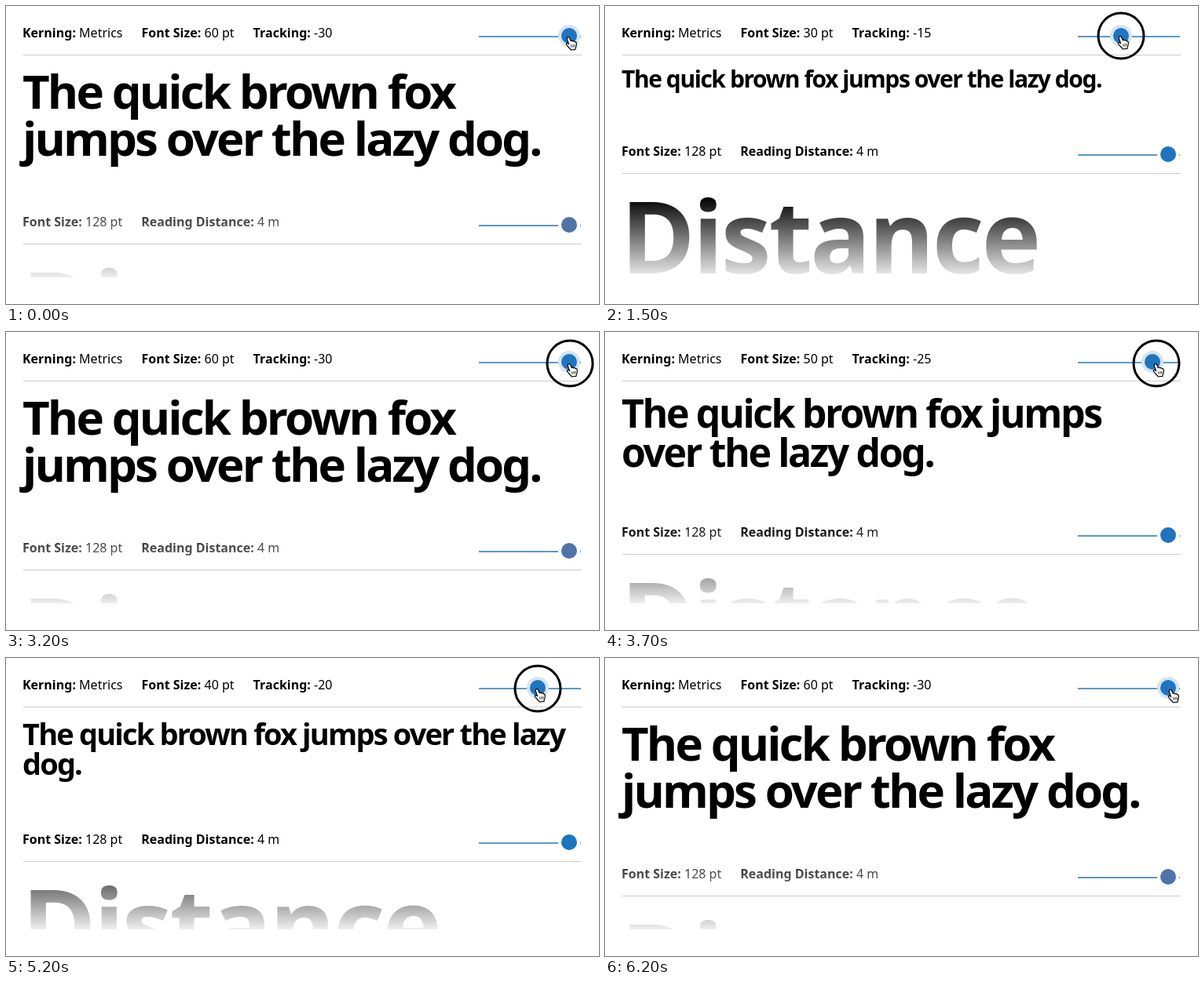
An HTML page for the animation above (6300 ms loop, 755 by 380 pixels).

```html
<!DOCTYPE html>
<html lang="en">
<head>
<meta charset="utf-8">
<title>Type size slider</title>
<style>
  html, body { margin: 0; width: 100%; height: 100%; overflow: hidden; background: #fff; }
  #stage { position: relative; width: 755px; height: 380px; overflow: hidden; color: #000; font-family: "Noto Sans", sans-serif; }
  #stage div, #stage svg, h1 { position: absolute; }
  .row { left: 0; top: 0; width: 755px; height: 63px; }
  .labels { left: 21px; top: 24px; display: flex; gap: 24px; font-size: 16px; line-height: 20px; white-space: pre; }
  .divider { left: 22px; top: 62px; width: 711px; height: 1px; background: #ccc; z-index: 2; }
  .rail { left: 602px; top: 38px; width: 130px; height: 2px; background: #5b9ac8; z-index: 2; }
  .thumb { left: 105px; top: -10px; width: 20px; height: 20px; border-radius: 50%; background: #1f74c0; box-shadow: 0 0 0 4px #fff; }
  .active .thumb { box-shadow: 0 0 0 4px #d5e4f0; }
  h1 { left: 21px; top: 78px; width: 712px; margin: 0; font-weight: 700; line-height: 1; letter-spacing: -.048em; }
  #sample { left: 20px; top: 77px; font-size: 128px; font-weight: 700; line-height: 128px; letter-spacing: -.023em; }
  #fade { left: 0; top: 244px; width: 755px; height: 136px; z-index: 1;
    background: linear-gradient(#fff0, #fff 109px); }
  #floor { left: 0; top: 346px; width: 755px; height: 34px; background: #fff; z-index: 3; }
  #pointer { left: 0; top: 0; overflow: visible; z-index: 4; }
</style>
</head>
<body>
<div id="stage">
  <div class="row active">
    <div class="labels">
      <span><b>Kerning:</b> Metrics</span>
      <span><b>Font Size:</b> <span id="points">60</span> pt</span>
      <span><b>Tracking:</b> <span id="tracking">-30</span></span>
    </div>
    <div class="rail"><div class="thumb" id="sizeThumb"></div></div>
    <div class="divider"></div>
  </div>
  <h1 id="heading">The quick brown fox jumps over the lazy dog.</h1>
  <div id="lower">
    <div class="row">
      <div class="labels">
        <span><b>Font Size:</b> 128 pt</span>
        <span><b>Reading Distance:</b> 4 m</span>
      </div>
      <div class="rail"><div class="thumb" id="distanceThumb"></div></div>
      <div class="divider"></div>
    </div>
    <div id="sample">Distance</div>
  </div>
  <div id="fade"></div>
  <div id="floor"></div>
  <svg id="pointer" width="1" height="1">
    <circle id="ring" r="29" fill="none" stroke="#000" stroke-width="3"/>
    <path d="M-2.4 1.2C-1.6 .1 0 .5 .6 1.8L2.2 5.6C3 4.8 4.3 5 4.8 6C5.6 5.4 6.8 5.8 7.1 6.8C8.2 6.4 9.2 7.2 9.3 8.6C9.5 11 9.2 12.6 8.2 14.2L8 16.3L2 17L1.4 15.6C-.6 14.2 -1.6 12.2 -3.4 10.4C-4.3 9.3 -3.2 8 -1.8 8.7L-.4 9.6L-2.6 3.4C-2.9 2.6 -2.9 1.8 -2.4 1.2Z"
      fill="#fff" stroke="#000" stroke-width="1.2" stroke-linejoin="round"/>
    <path d="M2.6 10.4L3 13.8M4.8 10.2L5.1 13.6M6.8 10L7 13.3" fill="none" stroke="#000" stroke-width=".8"/>
  </svg>
</div>
<script>
  const LOOP = 6300, TICK = 100, EASE_MS = 120;
  const PRESS = 200, RELEASE = 6000;

  // time, point size
  const sizes = [[0, 60], [640, 50], [1040, 40], [1240, 30], [2000, 40], [2340, 50], [2540, 60],
    [3540, 50], [3900, 40], [4240, 30], [5134, 40], [5334, 50], [5534, 60]];

  // time, x, y
  const path = [[0, 717, 39], [300, 717, 37], [400, 716, 37], [700, 706, 37], [1000, 686, 37],
    [1300, 663, 38], [1450, 657, 38], [1650, 657, 38], [2000, 667, 38], [2300, 687, 39],
    [2500, 706, 39], [2700, 716, 39], [3000, 718, 40], [3200, 718, 40], [3400, 714, 40],
    [3700, 702, 40], [4200, 666, 40], [4400, 656, 39], [4900, 655, 39], [5100, 665, 39],
    [5200, 677, 39], [5400, 699, 39], [5600, 716, 38], [5700, 721, 38], [5900, 721, 39], [6300, 721, 40]];

  const byId = id => document.getElementById(id);
  const [heading, lower, points, tracking, sizeThumb, distanceThumb, pointer, ring] =
    ["heading", "lower", "points", "tracking", "sizeThumb", "distanceThumb", "pointer", "ring"].map(byId);
  const mix = (a, b, k) => a + (b - a) * k;
  const clamp = k => Math.max(0, Math.min(1, k));

  function cursorAt(t) {
    const next = path.findIndex(p => p[0] > t);
    const a = path[next - 1], b = path[next];
    const k = (t - a[0]) / (b[0] - a[0]);
    return [mix(a[1], b[1], k), mix(a[2], b[2], k)];
  }

  function sizeAt(t) {
    const i = sizes.findLastIndex(s => s[0] <= t);
    const [start, target] = sizes[i];
    const from = i ? sizes[i - 1][1] : target;
    const rest = 1 - clamp((t - start) / EASE_MS);
    return { target, current: mix(from, target, 1 - rest * rest) };
  }

  function draw(t) {
    const { target, current } = sizeAt(t);
    points.textContent = target;
    tracking.textContent = -target / 2;
    sizeThumb.style.left = `${target * 2 - 15}px`;

    heading.style.fontSize = `${current}px`;
    const lines = Math.round(heading.offsetHeight / current);
    lower.style.top = `${lines * current + 121}px`;

    // The lower thumb dulls as it sinks into the fade.
    const dull = clamp((current - 50) / 10);
    distanceThumb.style.background =
      `rgb(${mix(31, 80, dull)} ${mix(116, 115, dull)} ${mix(192, 168, dull)})`;

    const [x, y] = cursorAt(t);
    pointer.style.transform = `translate(${x}px, ${y}px)`;
    ring.style.visibility = t >= PRESS && t < RELEASE ? "visible" : "hidden";
  }

  const began = performance.now();
  function frame() {
    const t = (performance.now() - began) % LOOP;
    draw(Math.floor(t / TICK) * TICK);
    requestAnimationFrame(frame);
  }
  frame();
</script>
</body>
</html>
```
